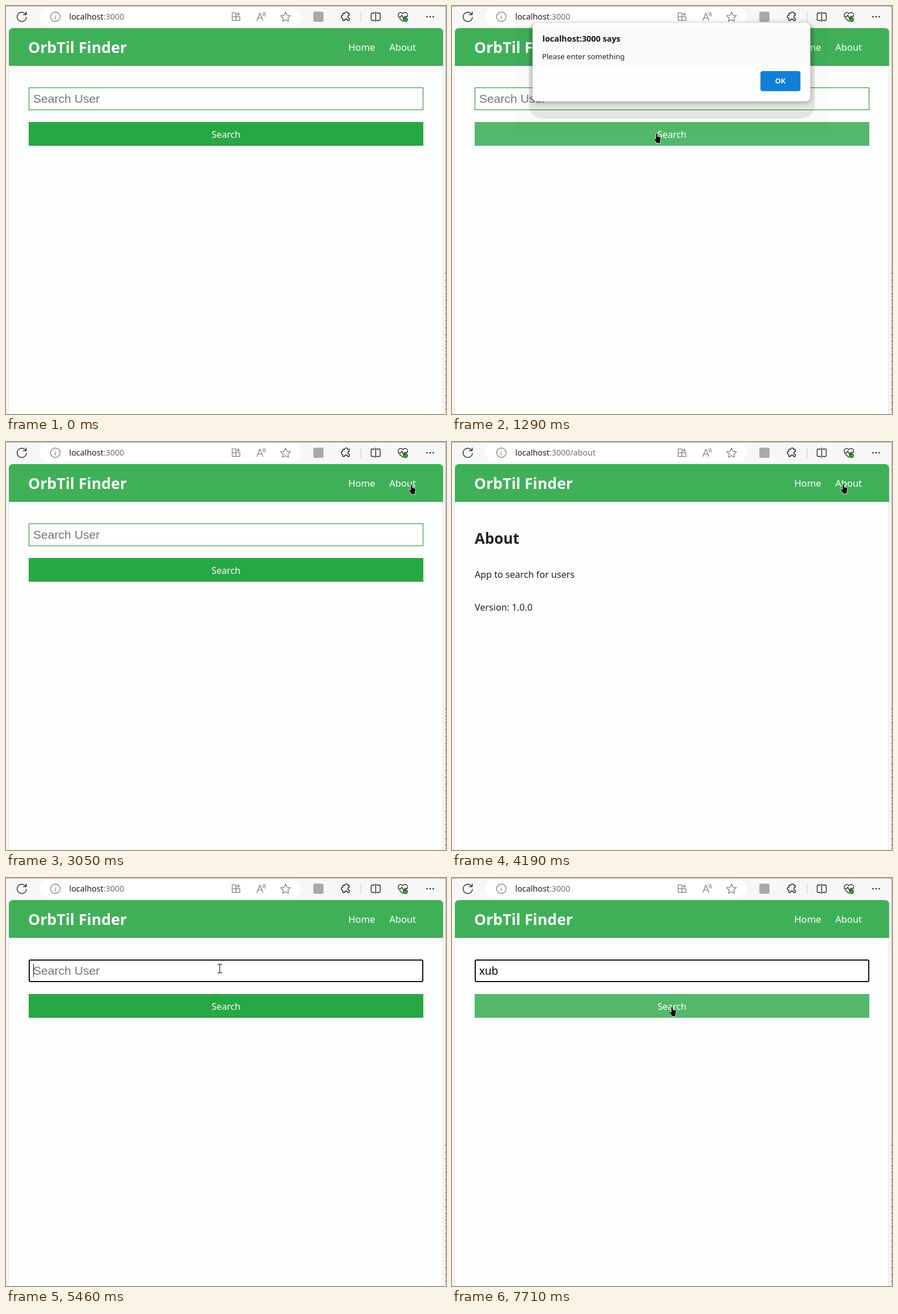
An HTML page for the animation above (7990 ms loop, 776 by 721 pixels).

```html
<!DOCTYPE html>
<html lang="en">
<head>
<meta charset="utf-8">
<title>User search</title>
<style>
  html, body { margin: 0; width: 100%; height: 100%; overflow: hidden; background: #f7f7f7; }
  svg { display: block; width: 776px; height: 721px; }
  text { font-family: "Noto Sans", "Open Sans", sans-serif; white-space: pre; }
  .icon { fill: none; stroke: #1c1c1c; stroke-width: 1.3; stroke-linecap: round; stroke-linejoin: round; }
  .soft { stroke: #6a6a6a; stroke-width: 1.1; }
  .nav { font-size: 16.6px; fill: #fff; }
  .bold { font-weight: 700; }
  .panel { filter: drop-shadow(0 2px 4px rgba(0, 0, 0, .35)); }
</style>
</head>
<body>
<svg viewBox="0 0 776 721">
  <!-- browser bar -->
  <rect width="776" height="721" fill="#f7f7f7"/>
  <rect width="776" height="1" fill="#a6a6a6"/>
  <rect x="59" y="3" width="461" height="32" rx="16" fill="#fff"/>
  <g class="icon">
    <path d="M35 15.2A8.2 8.2 0 1 0 36 20M35.6 10.5V15.4H30.6"/>
    <g class="soft">
      <circle cx="87" cy="19" r="8.4"/>
      <path d="M87 18V23M87 15.2V15.4"/>
      <path d="M399 12H405.500V25.500H399ZM399 19H412.500V25.500H405.500V12M409.500 11.500V17.500M406.500 14.500H412.500"/>
      <path d="M442.500 25.500L447.700 12.500L453 25.500M444.300 21.300H451.200M452.700 12.300Q454.600 14.500 453.600 17.200M455 10.800Q458.300 14.500 456.600 18.200"/>
      <path d="M493 10.800L495.600 16.200L501.500 17L497.200 21.100L498.300 27L493 24.200L487.700 27L488.800 21.100L484.500 17L490.400 16.200Z"/>
    </g>
    <path d="M594 13H597.300A2.600 2.600 0 0 1 602.500 13H605.500V16.500A2.600 2.600 0 0 0 605.500 21.700V25.500H602.200A2.500 2.500 0 0 0 597.200 25.500H594V21.700A2.600 2.600 0 0 1 594 16.500Z"/>
    <path d="M650 12.500H645.500Q644 12.500 644 14V24Q644 25.500 645.500 25.500H650M652 10.500V27.500M654 12.500H658.500Q660 12.500 660 14V24Q660 25.500 658.500 25.500H654"/>
    <path d="M692.300 18A4.400 4.400 0 0 1 700 13.700A4.400 4.400 0 0 1 707.700 18M692 19.500H696L698 16L701 22L703 18.500H708M694 22L700 27"/>
  </g>
  <rect x="542" y="10" width="18" height="18" rx="3" fill="#a9a9a9"/>
  <rect x="625.500" y="10" width="1" height="18" fill="#c4c4c4"/>
  <circle cx="704.500" cy="24" r="4.300" fill="#107c10"/>
  <path d="M702.500 24L704 25.500L706.600 22.700" fill="none" stroke="#fff"/>
  <g fill="#1c1c1c"><circle cx="742.500" cy="19" r="1.300"/><circle cx="748" cy="19" r="1.300"/><circle cx="753.500" cy="19" r="1.300"/></g>
  <text x="111.500" y="24.300" font-size="14.3" fill="#1b1b1b">localhost<tspan id="path" fill="#707070">:3000</tspan></text>

  <!-- page -->
  <path d="M5 721V47Q5 39 13 39H763Q771 39 771 47V721Z" fill="#fefefe"/>
  <path d="M4.500 106V721M770.500 106V721" stroke="#e4e4e4"/>
  <path d="M775.500 0V470" stroke="#b4b4b4"/>
  <path d="M775.500 470V721" stroke="#777" stroke-dasharray="5 2 2 3"/>
  <path d="M5 105.500V47Q5 39 13 39H763Q771 39 771 47V105.500Z" fill="#3fb058"/>
  <rect x="5" y="104.500" width="766" height="1" fill="#2b9f46"/>
  <text x="39" y="82.500" class="bold" font-size="26.7" fill="#fff">OrbTil Finder</text>
  <text x="603.800" y="79.300" class="nav">Home</text>
  <text x="676" y="79.300" class="nav">About</text>

  <g id="home">
    <rect id="field" fill="#fff"/>
    <text id="hint" x="48" y="171" font-size="21.1" fill="#757575" style="font-family:'Liberation Sans',Arial,sans-serif">Search User</text>
    <text id="typed" x="48" y="170.800" font-size="19" fill="#000"></text>
    <rect id="caret" y="152" width="1" height="23" fill="#000"/>
    <rect id="button" x="40" y="205" width="696" height="42" fill="#28a745"/>
    <text x="388" y="232.800" font-size="16.2" fill="#fff" text-anchor="middle">Search</text>
  </g>
  <g id="about" fill="#222">
    <text x="40" y="180" class="bold" font-size="26">About</text>
    <text x="40" y="240" font-size="16.2">App to search for users</text>
    <text x="40" y="298" font-size="16.2">Version: 1.0.0</text>
  </g>

  <!-- alert -->
  <g id="alert">
    <rect x="112" y="22" width="550" height="198" rx="4" opacity=".015"/>
    <path d="M135 50Q135 30 150 30H624Q640 30 640 50V171Q640 199 612 199H163Q135 199 135 171Z" opacity=".09"/>
    <g id="box">
      <rect x="142" y="31" width="490" height="138.500" rx="8" fill="#fff" class="panel"/>
      <text x="159.500" y="64" class="bold" font-size="14.4" fill="#111">localhost:3000 says</text>
      <text x="159" y="95.200" font-size="13.1" fill="#222">Please enter something</text>
      <rect id="ok" x="544" y="116" width="70.500" height="35.500" rx="4"/>
      <text x="579" y="138.300" class="bold" font-size="12.8" fill="#f2f8fd" text-anchor="middle">OK</text>
    </g>
  </g>

  <!-- pointers, each with its hot spot at 0,0 -->
  <g id="pointer">
    <path id="arrow" d="M0 0V13.500L3 10.700L5 15.200L7.300 14.200L5.400 9.800H9.600Z" fill="#000" stroke="#fff" stroke-width=".6"/>
    <path id="hand" d="M-1.500 1Q0 -1 1.500 1V5.500L6 6.500Q7.500 7 7.400 9L6.500 14V17.500H-1V15.500L-5 10.500Q-5 8.500 -3.500 9L-1.500 10.500Z" fill="#000" stroke="#fff" stroke-width=".8"/>
    <path id="beam" d="M-4 -7.500H-1.200L0 -6.500L1.200 -7.500H4M-4 7.500H-1.200L0 6.500L1.200 7.500H4M0 -6.500V6.500" fill="none" stroke="#333" stroke-width="1.3"/>
  </g>
</svg>
<script>
const LOOP = 7990;
const $ = id => document.getElementById(id);
const set = (id, attrs) => { for (const k in attrs) $(id).setAttribute(k, attrs[k]); };
const show = (id, on) => { $(id).style.display = on ? "" : "none"; };

// time, x, y, shape
const moves = [
  [0, 0, 0, ""],
  [300, 663, 704, "arrow"], [430, 706, 360, "arrow"], [580, 359, 267, "arrow"],
  [730, 352, 214, "hand"], [1010, 361, 225, "hand"],
  [1560, 480, 186, "arrow"], [1680, 577, 147, "arrow"], [1830, 584, 136, "arrow"],
  [2520, 610, 130, "arrow"], [2640, 645, 118, "arrow"], [2770, 684, 107, "arrow"],
  [2920, 705, 78, "hand"], [3050, 715, 75, "hand"],
  [4190, 690, 74, "hand"], [4320, 640, 73, "hand"], [4470, 628, 72, "hand"], [4620, 623, 79, "hand"],
  [4900, 500, 120, "arrow"], [5030, 371, 162, "beam"], [5180, 366, 166, "beam"], [5460, 377, 160, "beam"],
  [7430, 390, 190, "arrow"], [7580, 388, 224, "hand"], [7710, 388, 227, "hand"]
];
const word = "xub", keys = [5970, 6780, 7160];

function drawPointer(t) {
  const [, x, y, shape] = moves.filter(m => m[0] <= t).pop();
  for (const id of ["arrow", "hand", "beam"]) show(id, id === shape);
  set("pointer", { transform: `translate(${x} ${y})` });
}

function drawField(t) {
  const focus = t >= 5460;
  set("field", focus
    ? { x: 41, y: 145, width: 694, height: 38, rx: 2, stroke: "#101010", "stroke-width": 2 }
    : { x: 40.5, y: 144.5, width: 695, height: 39, rx: 0, stroke: "#178a22", "stroke-width": 1 });
  const count = keys.filter(k => k <= t).length;
  $("typed").textContent = word.slice(0, count);
  show("hint", !count);
  show("caret", focus && !(t >= 6500 && t < 6780) && t < 7710);
  set("caret", { x: Math.round(48 + (count ? $("typed").getComputedTextLength() - 0.8 : 0)) });
}

function hover(t) {
  if (t >= 730 && t < 2380) return t < 860 ? 0.5 : 1;
  return t < 7580 ? 0 : t < 7710 ? 0.5 : 1;
}

function draw(t) {
  const about = t >= 3760 && t < 4620;
  show("about", about);
  show("home", !about);
  $("path").textContent = about ? ":3000/about" : ":3000";
  drawField(t);
  set("button", { opacity: 1 - 0.2 * hover(t) });

  const entering = t < 1410;
  show("alert", t >= 1290 && t < 2380);
  set("box", { opacity: entering ? 0.97 : 1, transform: `translate(0 ${entering ? -1 : 0})` });
  set("ok", { fill: t < 1830 ? "#0c7cd6" : "#0479d8" });
  drawPointer(t);
}

const start = performance.now();
function tick() {
  draw((performance.now() - start) % LOOP);
  requestAnimationFrame(tick);
}
tick();
</script>
</body>
</html>
```
